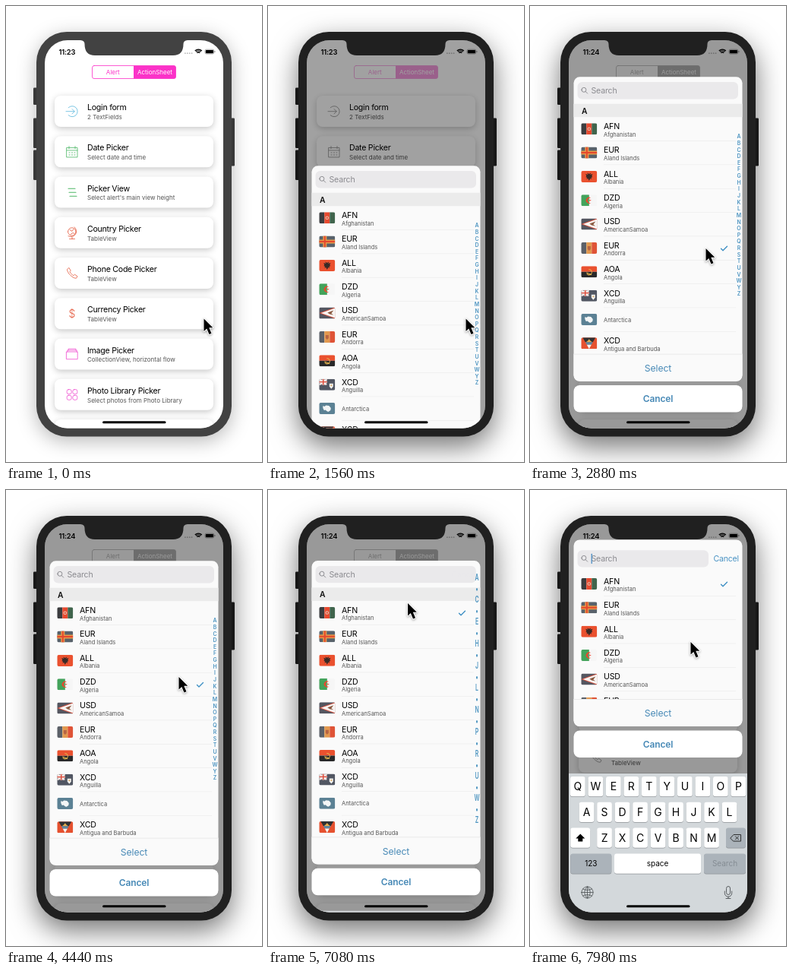
These frames come from a looping animation (337 px wide and 600 px high, 8000 ms). An HTML page with a canvas:

```html
<!DOCTYPE html>
<html>
<head>
<meta charset="utf-8">
<style>
html, body { margin: 0; width: 100%; height: 100%; overflow: hidden; background: #fff; }
canvas { display: block; width: 337px; height: 600px; }
</style>
</head>
<body>
<canvas id="stage"></canvas>
<script>
const canvas = document.getElementById('stage');
const ratio = window.devicePixelRatio || 1;
canvas.width = 337 * ratio;
canvas.height = 600 * ratio;
const c = canvas.getContext('2d');
const LOOP = 8000, STEP = 60;
const BLUE = '#4789b6', PINK = '#fb32c8', GREEN = '#4db666', RED = '#e4583c';

const lerp = (a, b, k) => a + (b - a) * k;

function box(x, y, w, h, r, fill) {
  c.beginPath();
  c.roundRect(x, y, w, h, r);
  if (fill) { c.fillStyle = fill; c.fill(); }
}

function shadowBox(x, y, w, h, r, fill, blur, dy, alpha) {
  c.save();
  c.shadowColor = `rgba(0,0,0,${alpha})`;
  c.shadowBlur = blur * ratio;
  c.shadowOffsetY = dy * ratio;
  box(x, y, w, h, r, fill);
  c.restore();
}

// y is the middle of the capital letters
function text(s, x, y, size, color, weight = 400, align = 'left', spacing = 0) {
  c.font = `${weight} ${size}px Inter, sans-serif`;
  c.letterSpacing = spacing + 'px';
  c.textAlign = align;
  c.fillStyle = color;
  c.fillText(s, x, y + size * 0.364);
}

function line(path, color, width = 0.8) {
  c.strokeStyle = color;
  c.lineWidth = width;
  c.lineCap = c.lineJoin = 'round';
  c.stroke(path instanceof Path2D ? path : new Path2D(path));
}

function at(x, y, draw) {
  c.save();
  c.translate(x, y);
  draw();
  c.restore();
}

const squares = new Path2D();
for (const x of [-6.8, 0.9]) for (const y of [-6.8, 0.9]) squares.roundRect(x, y, 5.9, 5.9, 2);

const cards = [
  ['Login form', '2 TextFields', '#5ab6dc', 'M-4.8-5A7 7 0 1 1-4.8 5M-8 0H3M0-3.2L3.2 0 0 3.2'],
  ['Date Picker', 'Select date and time', GREEN, 'M-7-5.5H7V7H-7zM-7-2H7M-4-7.3v3M4-7.3v3M-4 1h1.2M-.6 1h1.2M2.8 1H4M-4 4h1.2M-.6 4h1.2M2.8 4H4'],
  ['Picker View', "Select alert's main view height", GREEN, 'M-5-5H4M-4 0H5M-3 5H6'],
  ['Country Picker', 'TableView', RED, 'M-5.5-1.5a5.2 5.2 0 1 0 10.4 0 5.2 5.2 0 1 0-10.4 0M3-7.6A7.2 7.2 0 0 1-5 4.3M0 6V8M-3.5 8h7M-3-4L0-2 2-5M-2 2L1 0 3 1'],
  ['Phone Code Picker', 'TableView', RED, 'M-6.5-4.5C-6 0 1 7 5.5 6.5L7 4 3.5 1.5 1.8 3C0 2-2.5-.5-3-2L-1.8-3.6-4-7z'],
  ['Currency Picker', 'TableView', RED, ''],
  ['Image Picker', 'CollectionView, horizontal flow', '#ef4fd0', 'M-7.2-3.2H7.2V6.5H-7.2zM-6.2-3.2v-2H6.2v2M-5-5.2V-7H5v1.8'],
  ['Photo Library Picker', 'Select photos from Photo Library', '#ef4fd0', squares],
  ['', '', PINK, '']
];

const disc = (x, y, r) => `M${x - r} ${y}a${r} ${r} 0 1 0 ${2 * r} 0a${r} ${r} 0 1 0 ${-2 * r} 0z`;
const FULL = 'M0 0h21v15H0z';
const LEFT = 'M0 0h7v15H0z', MIDDLE = 'M7 0h7v15H7z', RIGHT = 'M14 0h7v15h-7z';
const countries = [
  ['AFN', 'Afghanistan', ['#3c3d3f', LEFT, '#e7492f', MIDDLE, '#40654d', RIGHT, '#e7c4b2', disc(10.5, 7.5, 2.3), '#e7492f', disc(10.5, 7.5, 1.2)]],
  ['EUR', 'Aland Islands', ['#58626b', FULL, '#e99a48', 'M5 0h5v15H5zM0 5h21v5H0z', '#e4482e', 'M6.5 0h2v15h-2zM0 6.5h21v2H0z']],
  ['ALL', 'Albania', ['#ea512f', FULL, '#3a2a26', 'M10.5 4L8 2.7 9 5 6 4l1 3-1 1 2 1-1 2 2-1 1.5 3 1.5-3 2 1-1-2 2-1-1-1 1-3-3 1 1-2.3z']],
  ['DZD', 'Algeria', ['#f6f6f6', FULL, '#43a35b', 'M0 0h10.5v15H0z', '#e6492f', 'M13 4.5A4 4 0 1 0 13 10.5 3.2 3.2 0 1 1 13 4.5zM11 6l1 1 1.6.4-1.6.6-1 1z']],
  ['USD', 'AmericanSamoa', ['#545660', FULL, '#dc533f', 'M0 7.5L21 0v15z', '#f7f4f2', 'M2.5 7.5L21 1v13z', '#8a5940', 'M11 7l8-3-3 4 3 2-5-1z']],
  ['EUR', 'Andorra', ['#5b6068', LEFT, '#e2994f', MIDDLE, '#df5336', RIGHT, '#b76443', 'M8.5 5h4v4l-2 2-2-2z']],
  ['AOA', 'Angola', ['#ea512f', 'M0 0h21v7.5H0z', '#29292a', 'M0 7.5h21V15H0z', '#e5b54e', 'M10 4a4 4 0 1 1-3 6l1-.5a3 3 0 1 0 2-4.500zM7 8l7 3-.5 1L7 9z']],
  ['XCD', 'Anguilla', ['#515662', FULL, '#f3e5e2', 'M0 0h2l8 6v2H8L0 2zM10.500 0v1.500L2 8H0V6.500L8.500 0zM4 0h3v8H4zM0 2.700h10.500v2.700H0z', '#dc4a39', 'M4.700 0h1.400v8H4.700zM0 3.400h10.500v1.300H0z', '#f2f2ef', 'M13.500 6h5v4l-2.500 3-2.500-3z', '#d8a35a', disc(16, 8.500, 1)]],
  ['', 'Antarctica', ['#5b8194', FULL, '#f2f5f6', 'M5 4l2 1 2-1.500 4 .5 2.500 3-.5 3-3 2-2-1-1.500-1.500-2 .5-1.500-3z']],
  ['XCD', 'Antigua and Barbuda', ['#e6512f', FULL, '#303133', 'M2 0h17l-3.500 6h-10z', '#e4ad4d', 'M6.500 6L9 4l1.500-2L12 4l2.500 2z', '#5d87a0', 'M5.500 6h10l-2 3.500h-6z', '#f5f3f0', 'M7.500 9.500h6L10.500 15z']]
];

function flag(x, y, shapes) {
  at(x, y, () => {
    box(0, 0, 21, 15, 2.2);
    c.clip();
    for (let i = 0; i < shapes.length; i += 2) {
      c.fillStyle = shapes[i];
      c.fill(new Path2D(shapes[i + 1]));
    }
  });
}

function home(tint) {
  c.fillStyle = '#fff';
  c.fillRect(51, 45, 235, 511);
  const accent = tint || PINK;
  box(113.5, 78.5, 110, 17, 2.5);
  line(new Path2D(), accent);
  c.stroke();
  box(168, 78.5, 55.5, 17, [0, 2.5, 2.5, 0], accent);
  text('Alert', 140.8, 87, 8, accent, 400, 'center');
  text('ActionSheet', 196, 87, 8, '#fff', 400, 'center');

  cards.forEach(([title, note, color, icon], i) => {
    const y = 118 + i * 53.25, ink = tint ? '#8c8c8c' : color;
    shadowBox(64, y, 209, 41, 8, '#fff', 9, 2.5, 0.22);
    text(title, 107, y + 15.3, 10.6, '#000', 400, 'left', -0.25);
    text(note, 107, y + 28, 8, '#555');
    if (title === 'Currency Picker') text('$', 87, y + 21, 14, ink, 300, 'center');
    else at(87, y + 20.7, () => line(icon, ink, i === 2 ? 1.1 : 0.8));
  });
}

function statusBar(t) {
  text(t < 2160 ? '11:23' : '11:24', 69.5, 60.2, 9.4, '#000', 600, 'left', -0.2);
  for (let i = 0; i < 4; i++) box(235 + i * 2.9, 61.3, 1.8, 1.8, 0.9, 'rgba(0,0,0,.28)');
  for (const r of [2.6, 4.6, 6.4]) {
    c.beginPath();
    c.arc(253.3, 63.5, r, -2.35, -0.79);
    c.strokeStyle = '#000';
    c.lineWidth = 1.4;
    c.lineCap = 'butt';
    c.stroke();
  }
  box(262, 57.2, 11.8, 5.8, 1.7);
  c.strokeStyle = '#777';
  c.lineWidth = 0.6;
  c.stroke();
  box(262.8, 58, 10.2, 4.2, 1, '#000');
  box(274.4, 59, 0.9, 2.2, 0.4, '#777');
}

function indexLetters(top, k, searching) {
  const letters = [...'ABCDEFGHIJKLMNOPQRSTUVWYZ'];
  const items = searching ? [...'A•C•E•H•J•L•N•P•R•U•W•Z'] : letters;
  const first = searching ? lerp(115, 113, k) : top + 78.5;
  const gap = searching ? lerp(14.55, 6.9, k) : 8.63;
  c.save();
  if (searching) c.globalAlpha = Math.max(0, 1 - k * 1.15);
  items.forEach((s, i) => at(275, first + i * gap, () => {
    c.scale(1, gap / 8.63);
    text(s, 0, 0, 6.9, '#4b93c0', 600, 'center');
  }));
  c.restore();
}

function sheet(t, shift, k, checked) {
  const top = lerp(93.3, 65.5, k) + shift;
  const bottom = lerp(493.8, 311, k) + shift;
  const rows = lerp(146.2, 108, k) + shift;
  const split = bottom - 36;

  c.save();
  box(57.5, top, 222, bottom - top, 8, '#fafafa');
  c.clip();
  c.save();
  c.beginPath();
  c.rect(57, lerp(rows, top + 42.5, k), 223, split - rows);
  c.clip();
  countries.forEach(([code, name, shapes], i) => {
    const y = rows + i * 31.35;
    flag(67.3, y + 8, shapes);
    if (code) text(code, 97, y + 12, 10.6, '#000', 400, 'left', -0.2);
    text(name, 97, y + (code ? 22.7 : 16), 7.5, '#555');
    c.fillStyle = '#e9e9e9';
    c.fillRect(97, y + 31, 174, 0.6);
    if (i === checked) at(255.5, y + 16, () => line('M-4 .3L-1.500 2.800 4-2.800', '#3f90c4', 1.4));
  });
  c.restore();

  c.globalAlpha = 1 - k;
  c.fillStyle = '#ebebeb';
  c.fillRect(57, rows - 17.5, 223, 17.5);
  text('A', 68, rows - 8.3, 10.3, '#111', 600);
  c.globalAlpha = 1;

  const field = top + lerp(6.8, 13.7, k);
  box(62.5, field, lerp(211.5, 172.5, k), 22.3, 6, '#eae9eb');
  at(71.5, field + 10.8, () => line(disc(-0.6, -0.6, 3) + 'M1.700 1.700L4.200 4.200', '#85858a', 0.9));
  text('Search', 80.5, field + 11, 10.6, '#8b8b90', 400, 'left', -0.2);
  if (k > 0) {
    c.globalAlpha = k;
    text('Cancel', 241.5, field + 11, 10.6, '#4a93c4', 400, 'left', -0.25);
    c.globalAlpha = 1;
  }
  if (t >= 7740) box(80.6, field + 4.5, 1.2, 13.3, 0.5, '#3f86c0');

  c.fillStyle = '#fafafa';
  c.fillRect(57, split, 223, 36);
  c.fillStyle = '#dedede';
  c.fillRect(57, split, 223, 0.6);
  text('Select', 168.5, bottom - 17.5, 12.2, BLUE, 400, 'center', -0.1);
  indexLetters(top, k, k > 0);
  c.restore();

  const cancel = lerp(499, 316.5, k) + shift;
  box(57.5, cancel, 222, 35.5, 8, '#fff');
  text('Cancel', 168.5, cancel + 18, 12, BLUE, 600, 'center', -0.1);
}

function key(x, y, w, label, size = 14, fill = '#fff', ink = '#000') {
  box(x, y + 0.8, w, 26.2, 3, '#8f9498');
  box(x, y, w, 26.2, 3, fill);
  text(label, x + w / 2, y + 13.1, size, ink, 400, 'center');
}

function keyboard(y) {
  const GRAY = '#abb3ba';
  c.fillStyle = '#d3d8db';
  c.fillRect(51, y, 235, 183);
  [['QWERTYUIOP', 53], ['ASDFGHJKL', 64.7], ['ZXCVBNM', 88.2]].forEach(([row, x], r) => {
    [...row].forEach((s, i) => key(x + i * 23.5, y + 4 + r * 33.8, 19.7, s));
  });
  key(53.3, y + 71.6, 25.8, '');
  at(66.3, y + 85, () => {
    c.fillStyle = '#000';
    c.fill(new Path2D('M0-5.500L6 .5H3V4.500H-3V.5H-6z'));
  });
  key(258, y + 71.6, 25.8, '', 10, GRAY);
  at(271, y + 84.8, () => line('M-7 0L-3-4.300H6.500V4.300H-3zM-.500-2L3.500 2M3.500-2L-.500 2', '#222', 0.9));
  key(53.3, y + 105.5, 54, '123', 10, GRAY);
  key(111, y + 105.5, 114, 'space', 10);
  key(229, y + 105.5, 55, 'Search', 10, GRAY, '#858d94');
  at(75.5, y + 156.5, () => line(disc(0, 0, 7.6) + 'M-7.600 0H7.600M0-7.600V7.600M0-7.600C-5-3-5 3 0 7.600C5 3 5-3 0-7.600M-6-4.500Q0-1.500 6-4.500M-6 4.500Q0 1.500 6 4.500', '#4d5255', 0.8));
  at(261, y + 156.5, () => line('M-2.500-5.500a2.500 2.500 0 0 1 5 0V.5a2.500 2.500 0 0 1-5 0zM-4.700-1.500V1a4.700 4.700 0 0 0 9.400 0V-1.500M0 5.700V8M-3 8H3', '#4d5255', 0.9));
}

const pointer = [
  [0, 260.5, 411.5], [2340, 260.5, 411.5], [2400, 257, 403], [2520, 240, 352], [2640, 231, 322],
  [2820, 231, 322], [2880, 231.5, 319], [2940, 231, 338], [3060, 230, 391], [3120, 229, 388],
  [3240, 225.5, 328], [3360, 231, 274], [3420, 234.5, 266], [4380, 234.5, 266], [4440, 227.5, 246],
  [4620, 203, 160], [4740, 192, 123], [4860, 188, 115], [5460, 188, 115], [5520, 188.5, 115],
  [5820, 182, 159], [5940, 181, 160], [6300, 167, 122], [6480, 162.5, 116], [6840, 162.5, 116],
  [7080, 184, 149], [7680, 206, 191], [7980, 211.5, 200]
];

function cursor(t) {
  const i = Math.max(1, pointer.findIndex(p => p[0] >= t));
  const [t0, x0, y0] = pointer[i - 1], [t1, x1, y1] = pointer[i];
  const k = (t - t0) / (t1 - t0);
  at(lerp(x0, x1, k), lerp(y0, y1, k), () => {
    const arrow = new Path2D('M0 0V16.500L3.800 12.900 7 20.500 10 19.200 6.800 11.800H11.800z');
    c.shadowColor = 'rgba(0,0,0,.35)';
    c.shadowBlur = 3 * ratio;
    c.shadowOffsetY = ratio;
    line(arrow, '#fff', 2);
    c.shadowColor = 'transparent';
    c.fillStyle = '#000';
    c.fill(arrow);
  });
}

function draw(t) {
  c.setTransform(ratio, 0, 0, ratio, 0, 0);
  c.fillStyle = '#fff';
  c.fillRect(0, 0, 337, 600);

  const active = t >= 660, bezel = active ? '#202020' : '#424242';
  for (const [x, y, h] of [[36, 107.500, 22.500], [36, 147.500, 39.500], [36, 189.500, 39.500], [295, 147.500, 63]])
    box(x, y, 6, h, 1.2, bezel);
  shadowBox(40, 34, 257, 532.5, 40, bezel, active ? 36 : 26, active ? 13 : 6, active ? 0.55 : 0.28);

  c.save();
  box(51, 45, 235, 510.5, 30);
  c.clip();
  home(t < 1560 ? '' : t < 1740 ? '#f398dc' : '#b6b6b6');
  statusBar(t);
  if (t >= 1560) {
    c.fillStyle = `rgba(0,0,0,${t < 1740 ? 0.37 : 0.4})`;
    c.fillRect(51, 45, 235, 511);
  }
  if (t >= 1380) {
    const shift = t < 1560 ? 461 : t < 1740 ? 117 : t < 1920 ? 2 : 0;
    const checked = t < 2880 ? -1 : t < 3660 ? 5 : t < 5940 ? 3 : 0;
    const s = Math.max(0, t - 7072) * 0.015;
    const k = t >= 7680 ? 1 : 1 - (1 + s) * Math.exp(-s);
    sheet(t, shift, k, checked);
    if (k > 0) keyboard(lerp(555, 373, k));
  }
  box(127, 546.3, 83.5, 3, 1.5, '#000');
  c.restore();

  c.fillStyle = bezel;
  c.fill(new Path2D('M98 44V45Q103.500 45.500 103.500 50C103.500 60 108 65 117 65H220C229 65 233.500 60 233.500 50Q233.500 45.500 239 45V44z'));
  cursor(t);
}

function tick() {
  const t = performance.now() % LOOP;
  draw(Math.floor(t / STEP) * STEP);
  requestAnimationFrame(tick);
}
tick();
</script>
</body>
</html>
```
